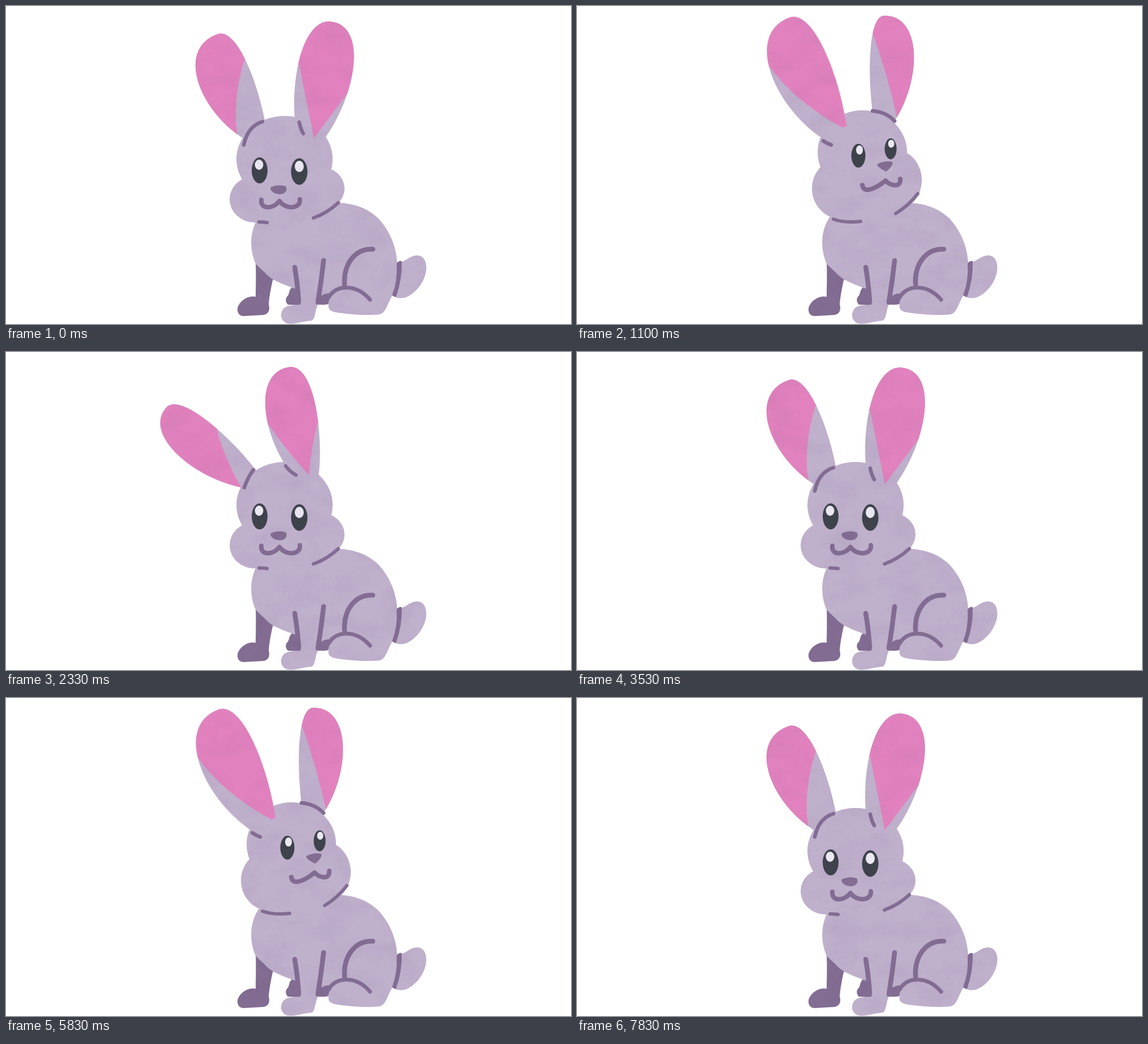
These frames come from a looping animation (998x561 px, 7910 ms). An HTML page:

```html
<!DOCTYPE html>
<html lang="en">
<head>
<meta charset="utf-8">
<title>Rabbit</title>
<style>
  html, body { margin: 0; width: 100%; height: 100%; overflow: hidden; background: #fff; }
  svg { display: block; width: 100vw; height: 100vh; }
  .fur { fill: #bfb0cc; }
  .pink { fill: #e182be; }
  .dark { fill: #836d93; }
  .line { fill: none; stroke: #836d93; stroke-linecap: round; stroke-linejoin: round; }
  .eye { fill: #3e434b; }
  .shine { fill: #ece9f3; }
</style>
</head>
<body>
<svg viewBox="0 0 998 561">
  <filter id="paper" filterUnits="userSpaceOnUse" x="0" y="0" width="998" height="561" color-interpolation-filters="sRGB">
    <feTurbulence id="grain" type="fractalNoise" baseFrequency=".018 .028" numOctaves="4"/>
    <feColorMatrix values="0 0 0 0 .35  0 0 0 0 .25  0 0 0 0 .42  .13 0 0 0 -.055"/>
    <feComposite in2="SourceAlpha" operator="in" result="wash"/>
    <feMerge><feMergeNode in="SourceGraphic"/><feMergeNode in="wash"/></feMerge>
  </filter>
  <g filter="url(#paper)">
    <path class="fur" d="M692 452C706 453 711 440 727 440C740 441 744 455 742 468C738 490 722 508 706 514C696 517 688 515 685 511Z"/>
    <path class="dark" d="M441 452C442 480 441 500 441 513C425 510 412 522 409 533C408 541 412 547 420 547L455 545C466 543 466 533 464 526C465 512 468 498 471 484L480 470Z"/>
    <path class="dark" d="M506 496C500 499 501 506 498 511C493 515 493 522 498 527H524L520 495Z"/>
    <path class="fur" d="M446 373C431 395 429 427 441 455Q448 462 456 469C466 482 482 488 506 497L514 500L520 527C510 527 496 527 490 534C483 543 485 556 497 560C510 562 525 556 540 555C547 552 546 535 551 527L570 526C568 533 572 538 580 540C610 545 640 546 660 544C672 541 673 525 684 508C692 490 693 475 691 455C690 425 678 397 658 375C638 356 614 348 584 347L560 320L470 340Z"/>
    <path class="dark" d="M690 454Q694 449 699 450Q700 482 689 513Q685 514 682 510Q692 485 690 454Z"/>
    <path class="dark" d="M547 526L551 516Q560 507 570 507L582 502Q571 512 569 526Q560 528 547 526Z"/>
    <path class="dark" d="M513 500L521 524Q518 528 510 527L506 500Z"/>
    <g class="line">
      <path d="M510 461Q515 490 517 521" stroke-width="8.5"/>
      <path d="M561 449Q557 485 551 522" stroke-width="8.5"/>
      <path d="M648 429C616 427 596 456 598 491" stroke-width="8.5"/>
      <path d="M570 514C584 490 620 491 643 518" stroke-width="7"/>
    </g>
    <g id="head">
      <g class="fur">
        <ellipse id="skull"/><ellipse id="cheekL"/><ellipse id="cheekR"/>
      </g>
      <ellipse id="eyeL" class="eye"/><ellipse id="shineL" class="shine"/>
      <ellipse id="eyeR" class="eye"/><ellipse id="shineR" class="shine"/>
      <path id="nose" class="dark"/>
      <path id="mouth" class="line" stroke-width="8"/>
    </g>
    <g id="ears"></g>
    <g class="line" stroke-width="6.5"><path id="markL"/><path id="markR"/></g>
    <g class="line" stroke-width="6"><path id="chinL"/><path id="chinR"/></g>
  </g>
</svg>
<script>
const LOOP = 7910;

// Ears: base x, y, angle, length, left and right bulge;
// then the lower tip of the pink, its height on the left and right edge, its bend.
const front = {
  move: '0 0',
  skull: '492 270 85 76', cheekL: '440 341 45 41', cheekR: '553 322 45 39',
  eyeL: '448 290 14 23', shineL: '447 280 7.5 9',
  eyeR: '518 292 14.5 23.5', shineR: '518 283 8 10',
  nose: 'M469 319Q482 314 494 318Q499 325 490 331Q481 334 472 329Q464 322 469 319Z',
  mouth: 'M451 342C449 358 470 360 483 344C494 360 521 358 519 341',
  chinL: 'M447 381Q454 381 461 382', chinR: 'M543 374Q568 365 587 347',
  earL: '438 224 -20.5 186 77 38 -30 0 127 -19',
  earR: '537 232 11.2 208 56 64 7 122 90 0',
  markL: 'M453 204Q427 212 420 245', markR: 'M518 205Q520 216 525 225'
};
const side = {
  move: '0 0',
  skull: '504 258 79 74', cheekL: '468 322 53 54', cheekR: '560 307 49 54',
  eyeL: '497 264 12.5 21', shineL: '499 254 6 8',
  eyeR: '554 252 10.5 18.5', shineR: '555 243 5.5 7',
  nose: 'M534 277Q547 272 557 275Q559 282 546 292Q540 290 533 284Q527 280 534 277Z',
  mouth: 'M504 316C506 332 528 322 545 308C553 317 572 322 571 305',
  chinL: 'M453 376Q471 383 501 380', chinR: 'M563 366Q585 353 602 331',
  earL: '452 221 -21.2 215 82 46 18 150 0 -22',
  earR: '543 201 0 184 30 66 23 161 0 6',
  markL: 'M435 238Q441 242 449 245', markR: 'M522 185Q546 187 561 203'
};
const frontSwept = {
  ...front,
  earL: '429 224 -49.2 193 63 36 -20 0 99 -8',
  earR: '531 218 -9.2 194 67 43 4 100 88 -4',
  markL: 'M437 208Q427 221 421 239', markR: 'M494 201Q501 211 512 217'
};
const sideSwept = {
  ...side,
  move: '11 -5',
  chinL: 'M444 362Q469 373 498 376', chinR: 'M565 361Q587 352 608 336',
  earL: '449 227 -46.9 218 69 56 16 86 0 6',
  earR: '537 186 -13.6 191 65 41 24 94 0 -8',
  markL: 'M442 243Q450 240 459 242', markR: 'M508 179Q528 172 543 184'
};

// Start time, from pose, to pose, share for the head, share for the ears
const turn = (t1, t2, t3, t4) => [
  [t1, front, sideSwept, .45, .6], [t2, front, sideSwept, 1.06, 1.35],
  [t3, sideSwept, sideSwept, 0, 0], [t4, side, side, 0, 0]
];
const turnBack = (t1, t2, t3, t4) => [
  [t1, side, frontSwept, .4, .5], [t2, side, frontSwept, .95, .98],
  [t3, frontSwept, frontSwept, 0, 0], [t4, front, front, 0, 0]
];
const timeline = [
  [0, front, front, 0, 0],
  ...turn(130, 230, 330, 470), ...turnBack(2100, 2230, 2330, 2430),
  ...turn(4100, 4200, 4300, 4400), ...turnBack(6070, 6170, 6300, 6400)
];

const byId = id => document.getElementById(id);

byId('ears').innerHTML = ['earL', 'earR'].map(id => `
  <clipPath id="${id}Clip"><path/></clipPath>
  <g id="${id}"><path class="fur"/><path class="pink" clip-path="url(#${id}Clip)"/></g>`).join('');

// Blends every number in two strings of the same form.
function mix(a, b, share) {
  const ends = b.match(/-?[\d.]+/g);
  let i = 0;
  return a.replace(/-?[\d.]+/g, v => +v + (ends[i++] - v) * share);
}

function drawEar(id, values) {
  const [x, y, angle, len, left, right, tip, hl, hr, bend] = values;
  const base = (left + right) / 5;
  const outline = `M${-base} 0C${-left} ${-.4 * len} ${-left} ${-len} 0 ${-len}` +
    `C${right} ${-len} ${right} ${-.4 * len} ${base} 0Q0 ${base} ${-base} 0Z`;
  const [el, er] = [-.78 * left, .78 * right];
  const inner = `M${el} ${-hl}Q${(el + tip) / 2 + bend} ${-hl / 2} ${tip} 0` +
    `Q${(er + tip) / 2 + bend} ${-hr / 2} ${er} ${-hr}H${len}V${-2 * len}H${-len}V${-hl}Z`;
  const group = byId(id);
  group.setAttribute('transform', `translate(${x} ${y}) rotate(${angle})`);
  byId(id + 'Clip').firstChild.setAttribute('d', outline);
  group.firstChild.setAttribute('d', outline);
  group.lastChild.setAttribute('d', inner);
}

function drawPose([, from, to, headShare, earShare]) {
  for (const part in from) {
    const share = /^(ear|mark)/.test(part) ? earShare : headShare;
    const value = mix(from[part], to[part], share);
    const numbers = value.split(' ').map(Number);
    if (part === 'move') byId('head').setAttribute('transform', `translate(${value})`);
    else if (part.startsWith('ear')) drawEar(part, numbers);
    else if (value[0] === 'M') byId(part).setAttribute('d', value);
    else ['cx', 'cy', 'rx', 'ry'].forEach((name, i) => byId(part).setAttribute(name, numbers[i]));
  }
}

let shown, seed;
function frame() {
  const t = performance.now() % LOOP;
  const current = timeline.findLast(entry => entry[0] <= t);
  if (current !== shown) drawPose(shown = current);
  const next = 1 + Math.floor(t / (LOOP / 72)) % 36;
  if (next !== seed) byId('grain').setAttribute('seed', seed = next);
  requestAnimationFrame(frame);
}
frame();
</script>
</body>
</html>
```
